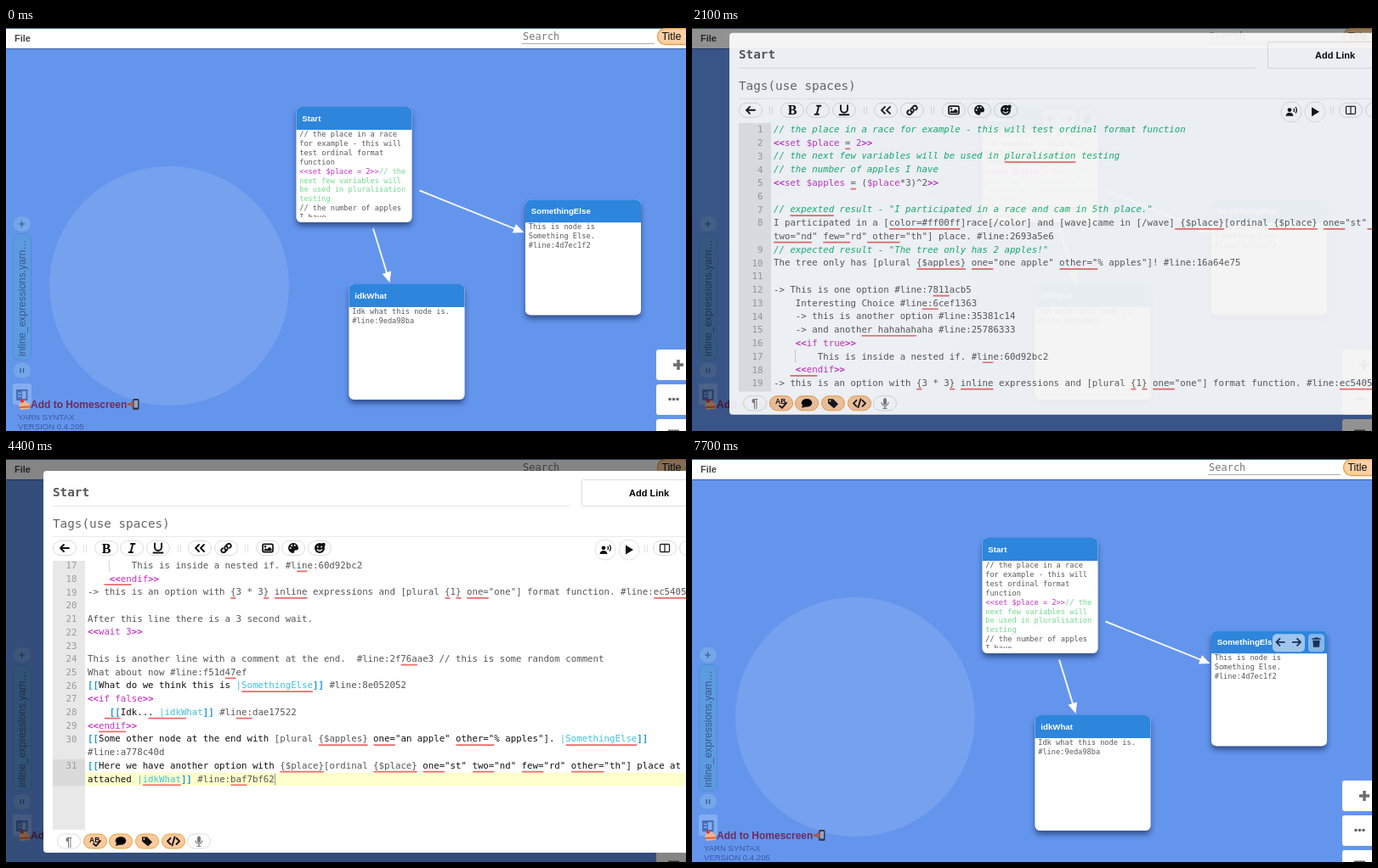
These frames come from a looping animation (800 px wide and 475 px high, 8 s). An HTML page:

```html
<!DOCTYPE html>
<html lang="en">
<head>
<meta charset="utf-8">
<title>Dialogue node editor</title>
<style>
html, body { margin: 0; width: 100%; height: 100%; overflow: hidden; background: #6495ed; }
svg { display: block; }
text { white-space: pre; font-family: "Liberation Sans", Arial, sans-serif; }
.mono, .mono text { font-family: "DejaVu Sans Mono", monospace; }
.b { font-weight: bold; }
.code { font-size: 10.74px; fill: #555; }
.body { font-size: 8.66px; fill: #5a5a5a; }
.num { fill: #999; text-anchor: end; }
.comment { fill: #12b36c; font-style: italic; }
.cmd { fill: #c531c5; }
.mark { fill: #c531c5; font-weight: bold; }
.link { fill: #2298d8; font-weight: bold; }
.dest { fill: #3cc3dc; }
.choice { fill: #111; }
.soft { fill: #6fdc8c; }
.ico { fill: none; stroke: #111; stroke-width: 1.9; stroke-linecap: round; stroke-linejoin: round; }
</style>
</head>
<body>
<svg id="stage" width="800" height="475" viewBox="0 0 800 475"></svg>
<script>
const LOOP = 8000, CW = 6.466, ROW = 15.74;
const rect = (x, y, w, h, r, fill, more = '') =>
  `<rect x="${x}" y="${y}" width="${w}" height="${h}" rx="${r}" fill="${fill}" ${more}/>`;
const text = (x, y, s, size, fill, cls = '', more = '') =>
  `<text x="${x}" y="${y}" font-size="${size}" fill="${fill}" class="${cls}" ${more}>${s}</text>`;
const line = (d, color, w = 1) => `<path d="${d}" fill="none" stroke="${color}" stroke-width="${w}"/>`;
const at = (x, y, s) => `<g transform="translate(${x} ${y})">${s}</g>`;
const esc = s => s.replace(/&/g, '&amp;').replace(/</g, '&lt;');
const span = (cls, s) => `<tspan class="${cls}">${esc(s)}</tspan>`;

// Script rows: ~...~ marks a spelling underline, a leading ^ marks a wrapped row.
const script = String.raw`// the place in a race for example - this will test ordinal format function
<<set $place ~=~ 2>>
// the next few variables will be used in ~pluralisation~ testing
// the number of apples I have
<<set $apples ~=~ ($place*3)^2>>

// ~expexted~ result - "I participated in a race and cam in 5th place."
I participated in a [~color=#ff00ff~]race[/color] and [wave]came in [/wave]~ {$place}~[ordinal~ {$place}~ ~one=~"st"~ ~
^~two="nd~" ~few="~rd"~ other~="th"] place. #line:2693a5e6
// expected result - "The tree only has 2 apples!"
The tree only has [plural ~{$apples}~ ~one=~"one apple" ~other="~% apples"]! #line:16a64e75

-> This is one option #line:7~811~acb5
    Interesting Choice #lin~e:6~cef1363
    -> this is another option #line:35381c14
    -> and anoth~er hahahah~aha #line:25786333
    <<if true>>
        This is inside a nested if. #l~in~e:60d92bc2
   ~ <<en~dif>>
-> this is an option with ~{~3 * 3~}~ ~inline~ expressions and [plural ~{~1~}~ ~one=~"one"] format function. #line:~ec5405~

After this line there is a 3 second wait.
<<wait 3>>

This is another line with a comment at the end.  #line:2f~76a~ae3 // this is some random comment
What about now #line:f51d~47~ef
[[What do we think this is |~SomethingElse~]] #line:8e052052
<<if false>>
   ~ [[~Idk..~. |idkW~hat]] #li~ne:~dae17522
<<~endif~>>
[[Some other node at the end with [plural ~{$apples}~ ~one=~"an apple" ~other="~% apples"]. |~SomethingElse~]]
^#line:a778c40d
[[Here we have another option with ~{$place}~[ordinal ~{$place}~ ~one=~"st" ~two=~"nd" ~few=~"rd" ~other=~"th"] place at
^attached |~idkWhat~]] #line:~baf~7bf62`.split('\n');

let inLink = false;
function paint(s) {
  if (s.startsWith('//')) return span('comment', s);
  if (s.includes('<<')) {
    return s.split(/(<<|>>|\$?[a-z]+| \d)/).map(p =>
      /^(<<|>>)$/.test(p) ? span('mark', p) : span(/^(\$?[a-z]+| \d)$/.test(p) ? 'cmd' : '', p)).join('');
  }
  return s.split(/(\[\[|\]\]|\|\w+|\{.*?\}|\[plural|\[ordinal)/).map(p => {
    if (p === '[[' || p === ']]') { inLink = p === '[['; return span('link', p); }
    if (p[0] === '|') return span('dest', p);
    return span(inLink && !/^(\{|\[)/.test(p) ? 'choice' : '', p);
  }).join('');
}

function codeRows() {
  let n = 0;
  return script.map((raw, i) => {
    const mid = 127.5 + i * ROW, wrapped = raw[0] === '^';
    let col = 0, out = '';
    const parts = raw.replace(/^\^/, '').split('~');
    parts.forEach((p, k) => {
      if (k % 2) out += rect(96 + col * CW, mid + 6.5, p.length * CW, 1.7, 0.8, '#ea6a66');
      col += p.length;
    });
    if (!wrapped) out += `<text class="code num" x="83.5" y="${mid + 4}">${++n}</text>`;
    return out + `<text class="code" x="96" y="${mid + 3.7}">${paint(parts.join(''))}</text>`;
  }).join('');
}

// Icons, each drawn around 0,0
const glyph = (s, size = 14, cls = 'b') => text(0, size * 0.36, s, size, '#111', cls, 'text-anchor="middle"');
const ico = d => `<path class="ico" d="${d}"/>`;
const solid = (d, c = '#111') => `<path d="${d}" fill="${c}"/>`;
const dot = (x, y, r, c = '#111') => `<circle cx="${x}" cy="${y}" r="${r}" fill="${c}"/>`;
const serif = 'font-family:Liberation Serif,serif;';
const icons = {
  back: ico('M5 0H-5M-1-4L-5 0L-1 4'),
  bold: `<text y="5.5" text-anchor="middle" style="${serif}font-weight:bold;font-size:16px">B</text>`,
  italic: ico('M-1-5H3.5M-3.5 5H1M1.3-5L-1.3 5'),
  under: ico('M-4-5.5V-1A4 4 0 0 0 4-1V-5.5M-5.5 5.5H5.5'),
  quotes: ico('M-1-4L-5 0L-1 4M5-4L1 0L5 4'),
  chain: ico('M-1 1.8A3 3 0 0 1-1-2L2-5A2.6 2.6 0 0 1 5.4-1.4L4-.2M1-1.8A3 3 0 0 1 1 2L-2 5A2.6 2.6 0 0 1-5.4 1.4L-4 .2'),
  image: rect(-6, -4.7, 12, 9.4, 1.5, 'none', 'stroke="#111" stroke-width="1.7"') + dot(-3, -1.8, 1.3) + solid('M-4.5 3.3V2L-2.5 0L-1 1.5L2-1.5L4.5 1V3.3Z'),
  palette: solid('M0-6A6 6 0 1 0 0 6C2 6 0 3 2.5 2.5H4.5C8 1 5-6 0-6Z') + dot(-3.3, 0, 1, '#fff') + dot(-1.8, -3, 1, '#fff') + dot(1.8, -3.2, 1, '#fff'),
  smile: dot(0, 0, 6) + dot(-2.2, -1.5, 1, '#fff') + dot(2.2, -1.5, 1, '#fff') + line('M-3 1.5Q0 5 3 1.5', '#fff', 1.3) + dot(4.5, -4, 2.2),
  speak: dot(-2, -2.2, 2.4) + solid('M-6.5 5Q-6 1-2 1T2.5 5Z') + line('M2.8-4Q4.4-2 2.8 0M5-5.6Q7.8-2 5 1.6', '#111', 1.3),
  play: solid('M-4-5.5L5 0L-4 5.5Z'),
  columns: rect(-5.5, -4.5, 11, 9, 1, 'none', 'stroke="#222" stroke-width="1.3"') + line('M0-4.5V4.5', '#222', 1.3),
  para: `<g opacity=".55">${glyph('¶', 14)}</g>`,
  spell: text(-7, 1, 'AB', 8.5, '#111', 'b') + ico('M-2 3L1 5.5L6-.5'),
  bubble: `<ellipse cy="-.5" rx="6.3" ry="4.8"/>` + solid('M-5 2L-6 5.5L0 4Z'),
  tag: solid('M-6-5H0L6 1L1 6L-6-0Z') + dot(-3.6, -2.7, 1.1, '#fcc99d'),
  angle: ico('M-3.5-3.5L-7 0L-3.5 3.5M3.5-3.5L7 0L3.5 3.5M1.5-5L-1.5 5'),
  mic: `<g opacity=".55">${rect(-2, -6, 4, 8, 2, '#111')}${line('M-4-1A4 4 0 0 0 4-1M0 3V6M-2.5 6H2.5', '#111', 1.2)}</g>`
};
const pill = (x, y, name, on) => at(x, y,
  rect(-13.5, -8.5, 27, 17, 8.5, on ? '#fcc99d' : '#fff', `stroke="${on ? '#eda03c' : '#dcdcdc'}"`) + icons[name]);
const round = (x, y, name) => at(x, y, `<circle r="12" fill="#fff" stroke="#e2e2e2"/>` + icons[name]);
const sep = (x, y) => line(`M${x - 1.5} ${y - 4}v9M${x + 1.5} ${y - 4}v9`, '#e3e3e3');

const tools = (x, y) => {
  const dark = '#1c3156', ar = d => `<path d="${d}" fill="none" stroke="${dark}" stroke-width="1.8"/>`;
  return at(x, y, rect(72, 4, 38, 21, 5, '#9fc5ef') + rect(114, 4, 19, 21, 4, '#84b6ea') +
    ar('M86.500 13.500H77M81 9L76.500 13.500L81 18M95 13.500H104.500M100.500 9L105 13.500L100.500 18') +
    solid('M118.500 9H121.500L122.500 8H125L126 9H128.500V10.500H118.500ZM119.300 11.500H127.700L127 19.500H120Z', dark));
};

function node(x, y, title, rows) {
  const body = rows.map((r, i) => `<text class="body" x="3.7" y="${35.2 + i * 10.87}">${r}</text>`).join('');
  return at(x, y, rect(0, 0, 136, 136, 6, '#fff', 'filter="url(#shadow)"') +
    solid('M0 27V6A6 6 0 0 1 6 0H130A6 6 0 0 1 136 6V27Z', '#2d85dc') +
    text(6.8, 17, title, 9.7, '#fff', 'b') +
    `<svg class="mono" width="136" height="130">${body}</svg>`);
}

function arrow(x1, y1, x2, y2) {
  const a = Math.atan2(y2 - y1, x2 - x1), len = Math.hypot(x2 - x1, y2 - y1);
  return `<g transform="translate(${x1} ${y1}) rotate(${a * 180 / Math.PI})">` +
    line(`M0 0H${len - 9}`, '#f4f7fd', 1.9) + solid(`M${len} 0l-12.500-5.500v11Z`, '#fff') + '</g>';
}

const startRows = ['// the place in a race', 'for example - this will', 'test ordinal format', 'function',
  span('cmd', '<<set $place = 2>>') + span('soft', '// the'),
  ...['next few variables will', 'be used in pluralisation', 'testing'].map(s => span('soft', s)),
  '// the number of apples', 'I have'];

const ink = '#38588f';
const side = rect(8.5, 221.5, 21, 19, 9, '#75a6ea', 'stroke="#5f95e0"') + line('M15 231h7M18.500 227.500v7', ink, 1.2) +
  rect(8.5, 242.5, 21, 149, 7, '#5d9be0', 'stroke="#508cd6"') +
  text(0, 0, 'inline_expressions.yarn…', 12, ink, '', 'transform="translate(23 387) rotate(-90)"') +
  rect(8.5, 394, 21, 19, 9, '#75a6ea', 'stroke="#5f95e0"') + line('M17 401v5.500M20.500 401v5.500', ink, 1.3) +
  rect(8, 419, 22, 25, 2, '#83adef') + rect(12, 426, 7, 12, 0, '#456fb8') + line('M13 427H24.500V438H12', '#456fb8', 2) +
  line('M14 430.500h4M14 434h4', '#83adef', 1.3);

const promo = solid('M15 445L19 438L28 443V449L17 450Z', '#f0b48c') + solid('M15.500 446L28 445.500V447.500L16 448Z', '#d8623f') +
  dot(19, 439.5, 2.2, '#d93a3f') +
  text(29, 448, 'Add to Homescreen', 12, '#6d2c5c', 'b') +
  rect(149, 437, 7.5, 13, 1.5, '#39364a') + rect(150.5, 439, 4.5, 8.5, 0, '#93a4bd') + solid('M143 442H147V439.500L151.500 443.500L147 447.500V445H143Z', '#a85a4c');

const scene = rect(0, 0, 800, 475, 0, '#6495ed') + dot(192, 304, 141, '#76a1ee') +
  rect(0, 0, 800, 24, 0, '#fff') + rect(0, 0, 800, 1, 0, '#2c7480') + rect(0, 24, 800, 1, 0, '#3b5f9e') +
  text(10, 16, 'File', 11, '#444', 'b') + text(608, 14, 'Search', 12, '#777', 'mono') +
  line('M607 18.500H763', '#aaa') + rect(766.5, 0.5, 44, 19, 9.5, '#fbd0a4', 'stroke="#e6a04c" stroke-width="1.4"') +
  text(771.5, 14, 'Title', 12.4, '#111') +
  side + `<g id="version">${text(14, 462.3, 'YARN SYNTAX', 9.6, '#3a5a9c')}${text(14, 473.3, 'VERSION 0.4.205', 9.6, '#3a5a9c')}</g>` + promo +
  node(341.5, 93, 'Start', startRows) +
  node(403.5, 302, 'idkWhat', ['Idk what this node is.', '#line:9eda98ba']) +
  node(611, 202.3, 'SomethingElse', ['This is node is', 'Something Else.', '#line:4d7ec1f2']) +
  `<g id="hoverA">${tools(341.5, 93)}</g><g id="hoverB">${tools(611, 202.3)}</g>` +
  arrow(432, 236.5, 451.5, 300) + arrow(486.5, 191.5, 609.5, 241) +
  [379, 420, 461].map(y => rect(765, y, 50, 36, 3, '#fff')).join('') +
  line('M785 397H797M791 391V403', '#6c6c6c', 3.4) + [781, 785.5, 790].map(x => dot(x, 437.5, 1.8, '#666')).join('') +
  line('M779 474.500H792', '#666', 2);

const bar = ['back:69', 'bold:118', 'italic:148', 'under:179', 'quotes:228', 'chain:259', 'image:308', 'palette:338', 'smile:369'];
const foot = ['para:74', 'spell:105:1', 'bubble:135:1', 'tag:166:1', 'angle:197:1', 'mic:227'];
const pills = (list, y) => list.map(s => { const [n, x, on] = s.split(':'); return pill(+x, y, n, on); }).join('');

const modal = rect(44, 14, 780, 450, 4, '#fff') +
  text(55, 44.3, 'Start', 14.3, '#555', 'mono b') + line('M55 55.500H663', '#e4e4e4') +
  text(55, 81, 'Tags(use spaces)', 14.3, '#666', 'mono') + line('M55 91.500H800', '#eaeaea') +
  rect(677.5, 24.5, 150, 31, 1, '#fff', 'stroke="#e0e0e0"') + text(733, 44, 'Add Link', 11, '#000', 'b') +
  pills(bar, 105) + [93, 204, 283, 753].map(x => sep(x, 105)).join('') +
  round(705, 107, 'speak') + round(733, 107, 'play') + pill(775, 105, 'columns') + rect(792.5, 96.5, 27, 17, 8.5, '#fff', 'stroke="#dcdcdc"') +
  pills(foot, 450.5) +
  `<svg x="0" y="120" width="800" height="317" viewBox="0 120 800 317" class="mono">` +
  rect(55, 120, 38, 317, 0, '#e8e8e8') + '<g id="scroll">' +
  rect(55, 623.9, 38, 31.5, 0, '#dadada') + rect(93, 639.6, 707, 15.7, 0, '#ffffcc') +
  `<path d="M121.500 387.500v15.700" stroke="#aaa" stroke-dasharray="1 1"/>` + codeRows() + line('M316.500 640.500v14', '#999') + '</g></svg>';

document.getElementById('stage').innerHTML =
  `<defs><filter id="shadow" x="-20%" y="-20%" width="140%" height="140%">
  <feDropShadow dx="0" dy="4.5" stdDeviation="3" flood-color="#1d3566" flood-opacity=".7"/></filter></defs>` +
  scene + rect(0, 0, 800, 475, 0, '#000', 'id="dim"') + `<g id="modal">${modal}</g>`;

// Step tables: [time, value], each held until the next
const steps = {
  open: [[0, 0], [2000, .5], [2100, .9], [2400, 1], [7000, .88], [7100, .7], [7200, .5], [7300, .3], [7400, .12], [7500, 0]],
  scroll: [[0, 0], [3100, 45], [3200, 135], [3600, 180], [3800, 225], [4400, 270], [4500, 315], [4600, 360], [5200, 368], [6900, 0]],
  hoverA: [[0, 0], [400, .25], [500, .5], [600, .75], [700, 1], [2400, 0]],
  hoverB: [[0, 0], [7700, 1]],
  version: [[0, 1], [2000, 0], [6900, 1]]
};
const value = (name, t) => steps[name].reduce((v, s) => t >= s[0] ? s[1] : v, 0);
const el = id => document.getElementById(id);
const fade = (id, v) => el(id).setAttribute('opacity', v);

function draw() {
  const t = performance.now() % LOOP, p = value('open', t);
  fade('modal', p);
  fade('dim', p * 0.48);
  el('modal').setAttribute('transform', `translate(0 ${-82 * (1 - p)})`);
  el('scroll').setAttribute('transform', `translate(0 ${-value('scroll', t)})`);
  for (const id of ['hoverA', 'hoverB', 'version']) fade(id, value(id, t));
  requestAnimationFrame(draw);
}
draw();
</script>
</body>
</html>
```
